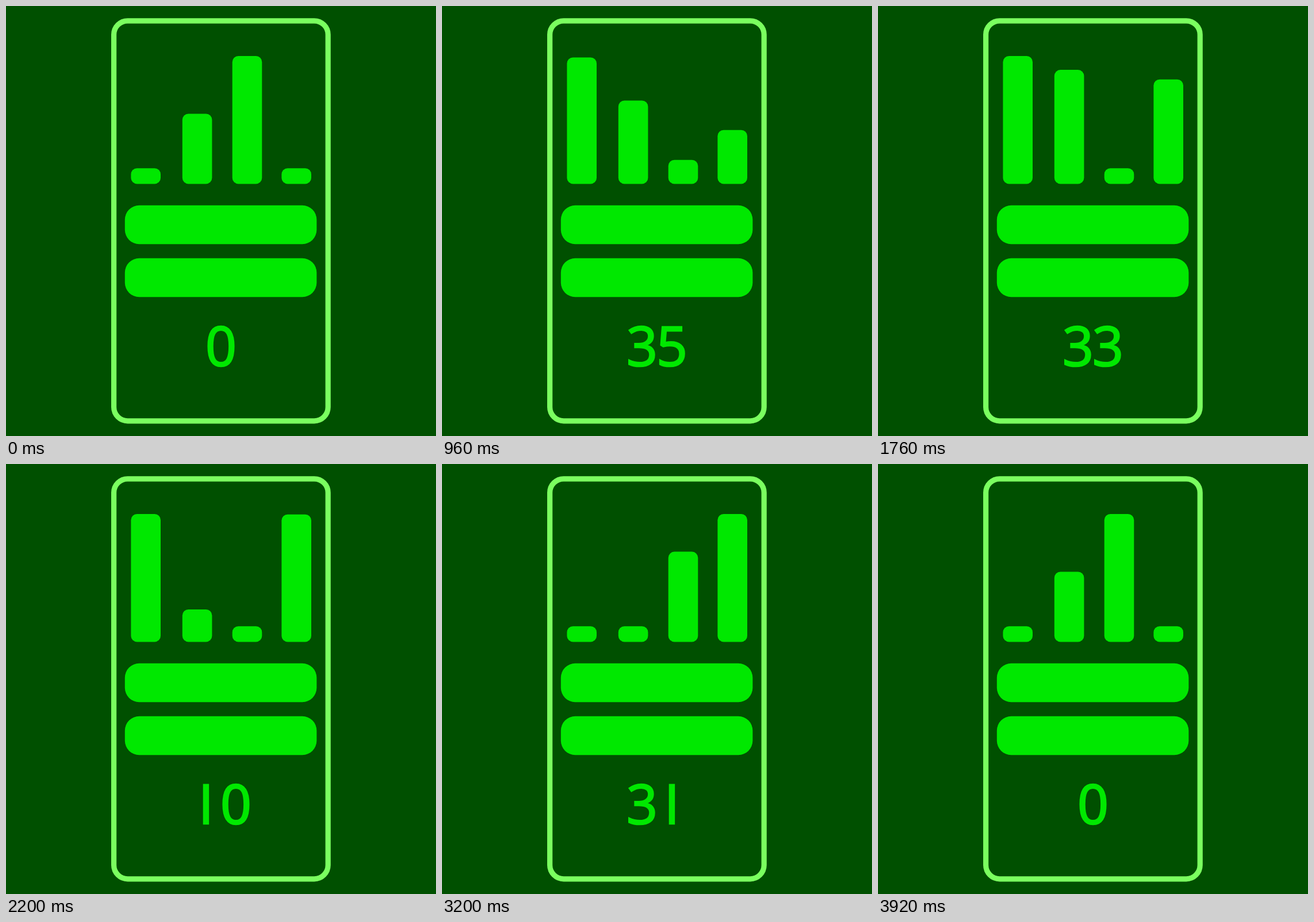
Recreate the animation shown at these times as an HTML page. Size 748 by 748 pixels, loop 4 s.

```html
<!DOCTYPE html>
<html lang="en">
<head>
<meta charset="utf-8">
<title>Level meter</title>
<style>
  html, body { margin: 0; width: 100%; height: 100%; overflow: hidden; background: #005000; }
  svg { display: block; width: 100%; height: 100%; }
  text {
    font: 400 94.4px "Open Sans", sans-serif;
    text-anchor: middle;
    stroke: #00e800;
    stroke-width: 2.6px;
  }
</style>
</head>
<body>
<svg viewBox="0 0 748 748">
  <rect width="748" height="748" fill="#005000"/>
  <rect x="187.6" y="25.8" width="372.6" height="696" rx="24" fill="none" stroke="#7aff5f" stroke-width="9.2"/>
  <g fill="#00e800">
    <g class="bars">
      <rect x="217.4" width="51.6" rx="10.5"/>
      <rect x="306.8" width="51.6" rx="10.5"/>
      <rect x="393.7" width="51.6" rx="10.5"/>
      <rect x="479.4" width="51.6" rx="10.5"/>
    </g>
    <rect x="206.8" y="346.8" width="333.6" height="67.4" rx="25"/>
    <rect x="206.8" y="438.8" width="333.6" height="67.4" rx="25"/>
    <text y="625.9"></text>
    <text y="625.9"></text>
  </g>
</svg>
<script>
  const LOOP = 4000, STEP = 40, MOVE = 900;
  const BASE = 309.4, LOW = 27.2, RANGE = 195.2;
  const HALF = 0.485, MOST = 0.66;

  const bars = document.querySelectorAll(".bars rect");
  const digits = document.querySelectorAll("text");

  // Progress from 0 to 1 of an eased move that begins at start.
  function moveAt(t, start, span = MOVE) {
    const u = Math.min(1, Math.max(0, (t - start) / span));
    return u * u * (3 - 2 * u);
  }

  function showNumber(n) {
    // The numeral one is a plain upright stroke.
    const chars = String(n).replace(/1/g, "I");
    digits.forEach((el, i) => {
      el.textContent = chars[i] || "";
      el.setAttribute("x", 374 + 52 * (i - (chars.length - 1) / 2));
    });
  }

  function draw(time) {
    const t = Math.floor((time % LOOP) / STEP) * STEP;
    const go = (start, span) => moveAt(t, start, span);
    const reset = go(3200, 720);

    const levels = [
      go(120) - go(2220),
      HALF + (1 - HALF) * go(680) - go(1580, 820) + HALF * reset,
      1 - go(210) + go(2650),
      MOST * go(500) + (1 - MOST) * go(1400, 850) - reset
    ];
    levels.forEach((level, i) => {
      const h = LOW + RANGE * level;
      bars[i].setAttribute("y", BASE - h);
      bars[i].setAttribute("height", h);
    });

    showNumber(Math.round(50 * go(200, 1200) - 40 * go(1400, 800) + 21 * go(2200, 600) - 31 * reset));
  }

  const start = performance.now();
  function tick() {
    draw(performance.now() - start);
    requestAnimationFrame(tick);
  }
  tick();
</script>
</body>
</html>
```
